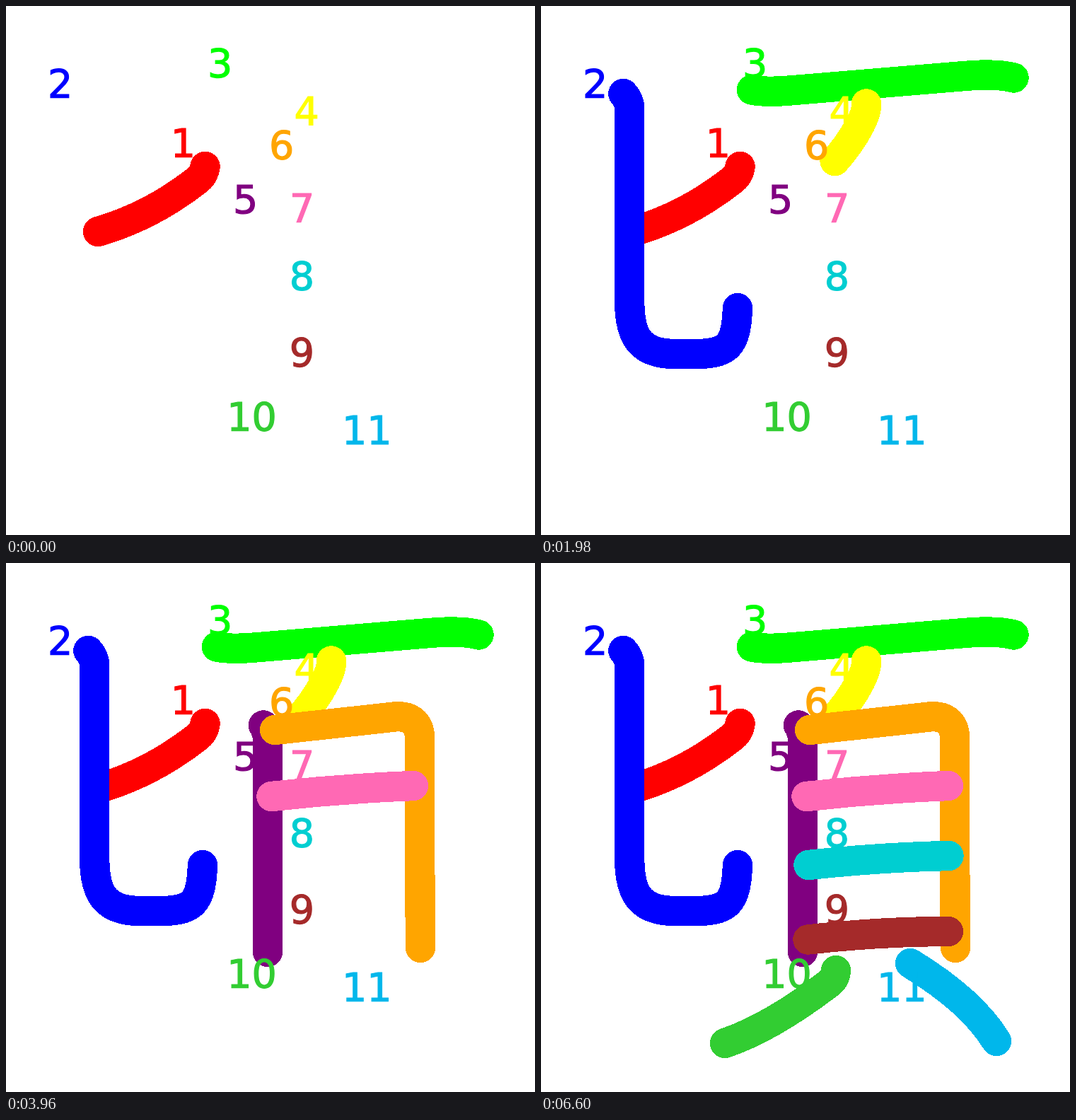
Recreate the animation shown at these times as an HTML page. Size 748x748 px, loop 7260 ms.

```html
<!DOCTYPE html>
<html>
<head>
<meta charset="utf-8">
<style>
html, body { margin: 0; width: 100%; height: 100%; overflow: hidden; background: #fff; }
svg { display: block; width: 100vw; height: 100vh; }
path { fill: none; stroke-width: 42.4px; stroke-linecap: round; stroke-linejoin: round; shape-rendering: crispEdges; }
text { font: 55.5px "DejaVu Sans", sans-serif; stroke-width: 1.2px; }
</style>
</head>
<body>
<svg viewBox="0 0 748 748"></svg>
<script>
const STEP = 660;

// colour, label x, label baseline, stroke path
const strokes = [
  ["#ff0000", 232.7, 213, "M281.5 227Q280 238 272 245Q206 297 130 319"],
  ["#0000ff", 59, 129, "M116.3 124Q125.2 134 125.2 145V418C125.2 470 142 492 190 492H225C262 490 276 483 278 427"],
  ["#00ff00", 285, 100, "M298 118.5Q318 122.5 352 119.5L605 98.5Q645 95.5 668.5 101.5"],
  ["#ffff00", 407.5, 167.5, "M460 138.5Q461 150 449 172Q436 196 415.5 219"],
  ["#800080", 321, 292.5, "M364 229.5Q370 238 370 250V550"],
  ["#ffa500", 372, 216, "M380 236L545 218C572 214 585 226 585 248V394L586 544"],
  ["#ff69b4", 401, 305, "M375.5 330Q475 319 576 315"],
  ["#00ced1", 400.8, 401, "M378.5 427Q480 416 576.5 414"],
  ["#a52a2a", 400.8, 508.5, "M377.5 532.5Q480 521 576 521"],
  ["#32cd32", 312.3, 600, "M417 576Q416 588 407 594.5Q325 657 260 679"],
  ["#00b7eb", 475, 618.5, "M522 566Q609 619 644 676"]
];

const svg = document.querySelector("svg");

function add(tag, attrs, text = "") {
  const el = document.createElementNS("http://www.w3.org/2000/svg", tag);
  for (const key in attrs) el.setAttribute(key, attrs[key]);
  el.textContent = text;
  return svg.appendChild(el);
}

const paths = strokes.map(([stroke, , , d]) => add("path", { stroke, d }));
strokes.forEach(([fill, x, y], i) => add("text", { fill, stroke: fill, x, y }, i + 1));

const start = performance.now();

function draw() {
  const elapsed = Math.max(0, performance.now() - start);
  const current = Math.floor(elapsed / STEP) % strokes.length;
  paths.forEach((path, i) => path.style.display = i <= current ? "" : "none");
  requestAnimationFrame(draw);
}
draw();
</script>
</body>
</html>
```
